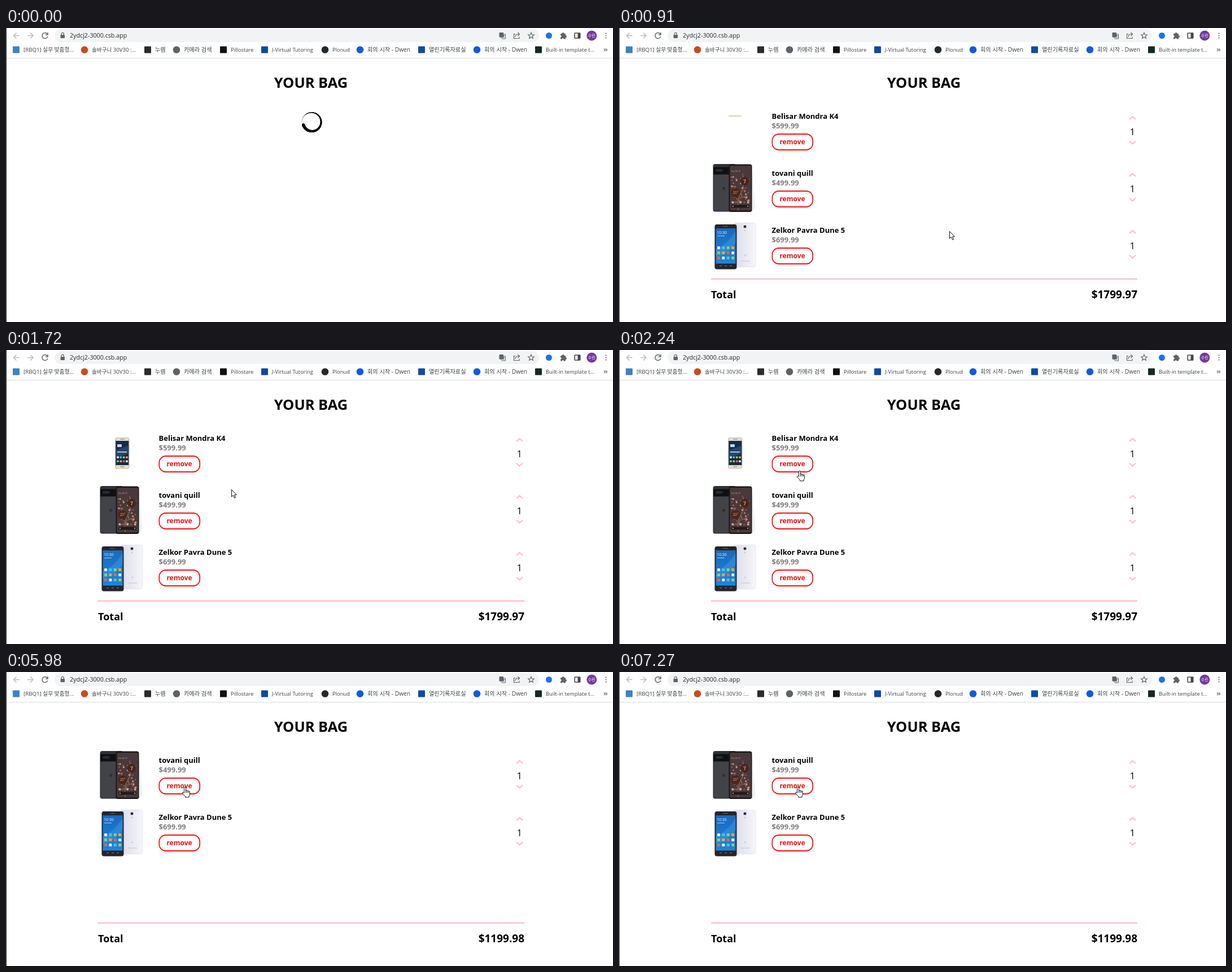
Recreate the animation shown at these times as an HTML page. Size 1075x521 px, loop 8000 ms.

```html
<!DOCTYPE html>
<html lang="ko">
<head>
<meta charset="utf-8">
<title>Your bag</title>
<style>
html, body { margin: 0; width: 100%; height: 100%; overflow: hidden; background: #fff; }
svg { display: block; font-family: 'Open Sans', 'Noto Sans CJK KR', 'Noto Sans CJK', sans-serif; }
.icon { fill: none; stroke: #5f6368; stroke-width: 1.5; }
.bold { font-weight: 700; }
</style>
</head>
<body>
<svg id="stage" width="1075" height="521" viewBox="0 0 1075 521"></svg>
<script>
const LOOP = 8000;
const stage = document.getElementById('stage');

const text = (x, y, size, str, attrs = '') =>
  `<text x="${x}" y="${y}" font-size="${size}" ${attrs}>${str}</text>`;
const rect = (x, y, w, h, fill, r = 0, attrs = '') =>
  `<rect x="${x}" y="${y}" width="${w}" height="${h}" fill="${fill}" rx="${r}" ${attrs}/>`;
const disc = (x, y, r, fill, attrs = '') =>
  `<circle cx="${x}" cy="${y}" r="${r}" fill="${fill}" ${attrs}/>`;
const icon = (d, attrs = '') => `<path class="icon" d="${d}" ${attrs}/>`;
const repeat = (n, draw) => Array.from({ length: n }, (_, i) => draw(i)).join('');

// Browser toolbar and bookmarks
function toolbar() {
  const pale = 'style="stroke:#b9bcc0"';
  return rect(86, 2, 858, 23, '#f1f3f4', 11.5) +
    icon('M23.5 13.5h-10m5-5l-5 5l5 5', pale) +
    icon('M38 13.5h10m-5-5l5 5l-5 5', pale) +
    icon('M73 10.5a5 5 0 1 0 .8 4.5M74 8v4h-4') +
    rect(96.5, 12, 7.5, 6, '#5f6368', 1) +
    icon('M98 12.5v-2a2.2 2.2 0 0 1 4.4 0v2', 'style="stroke-width:1.2"') +
    text(113, 17.3, 10.7, '2ydcj2-3000.csb.app', 'fill="#27292c"') +
    rect(873.5, 8, 7.5, 8.5, '#5f6368', 1) +
    icon('M879 11h5.5v8h-6l-2-3M879 13.5h4.5M881.3 12v1.5q0 2.5-2 3.5m.5-3q1 2 3 3', 'style="stroke-width:1"') +
    icon('M902 10.5h-2.5v8h9.5v-3M902 16q0-5 5-5h2.5m-3-3l3 3l-3 3', 'style="stroke-width:1.1"') +
    icon('M930 8.3l1.5 3.5 3.8.3-2.9 2.4.9 3.8-3.3-2-3.3 2 .9-3.8-2.9-2.4 3.8-.3z', 'style="stroke-width:1.2"') +
    disc(961.5, 13.5, 5.5, '#1a73e8') +
    '<path fill="#5f6368" d="M982 10h2.5a2 2 0 0 1 4 0h2.500v3a2 2 0 0 1 0 4v2.500h-3.200a1.600 1.600 0 0 0-3.200 0H982v-3a1.700 1.700 0 0 0 0-3.400z"/>' +
    rect(1007.2, 9, 9.5, 9, 'none', 0.5, 'stroke="#44474b" stroke-width="1.6"') +
    rect(1012.5, 9, 4, 9, '#44474b') +
    disc(1037.3, 13.5, 9, '#77389f') +
    text(1037.3, 16, 7, '수린', 'fill="#fff" text-anchor="middle"') +
    repeat(3, i => disc(1062.5, 9.5 + 4 * i, 1.1, '#5f6368')) +
    bookmarks() +
    icon('M1059 36.5l2.300 2.300-2.300 2.300m3.200-4.600l2.300 2.300-2.300 2.300', 'style="stroke-width:1.2"') +
    rect(0, 53, 1075, 1, '#dcdee1') +
    rect(0, 0, 1, 521, '#333');
}

function bookmarks() {
  // icon centre, shape, colour, label, label size
  const list = [
    [18, 'square', '#3a83c5', '[RBQ1] 실무 맞춤형...', 9.7],
    [139, 'circle', '#cb4b1e', '솔바구니 30V30 :...', 9.6],
    [251, 'square', '#2b2b2b', '누렘', 10.2],
    [302, 'circle', '#5f6368', '카메라 검색', 10.2],
    [385, 'square', '#111', 'Pillostare', 9.4],
    [458, 'square', '#0b4aa2', 'J-Virtual Tutoring', 9.4],
    [565, 'circle', '#24292f', 'Plonud', 9.4],
    [627, 'circle', '#0b5cdf', '회의 시작 - Dwen', 10.2],
    [736, 'square', '#0c4da2', '열린기록자료실', 10.2],
    [834, 'circle', '#0b5cdf', '회의 시작 - Dwen', 10.2],
    [943, 'square', '#15291f', 'Built-in template t...', 9.4]
  ];
  return list.map(([x, shape, color, label, size]) =>
    (shape === 'circle' ? disc(x, 38.5, 6.3, color) : rect(x - 6, 32.5, 12, 12, color, 1)) +
    text(x + 13, 42, size, label, 'fill="#3c4043"')).join('');
}

// Ring of dots that grows from a hairline to a thick round end
const spinner = () => '<g id="spinner">' + repeat(180, i => {
  const a = (163 - i * 1.9) * Math.PI / 180;
  const w = 2.4 * (1 - i / 180) + 0.15;
  const r = 18 - w;
  return disc((541.5 + r * Math.cos(a)).toFixed(2), (167 + r * Math.sin(a)).toFixed(2), w.toFixed(2), '#000');
}) + '</g>';

const appIcons = (x, y, cols, rows, dx, dy, size) => {
  const colors = ['#f2f5f7', '#f4a63a', '#54bfd9', '#e9654c', '#8fcf6a'];
  return repeat(cols * rows, i => rect(x + dx * (i % cols), y + dy * Math.floor(i / cols),
    size, size, colors[(i * 2 + Math.floor(i / cols)) % 5], 1));
};

const smallPhone = () =>
  rect(193, 155, 25.5, 55.5, '#cdbfac', 4) +
  rect(194.3, 156, 23, 53.5, '#e5ddd0', 3) +
  rect(202, 157.5, 8, 1, '#8c8277') +
  rect(194.300, 161, 23, 43, '#132c49') +
  '<path d="M194.300 178l23-9v14l-23 9z" fill="#24476c"/>' +
  rect(197, 167, 8, 5, '#c7d7e4', 1) +
  rect(197, 180, 17, 1.500, '#e4eaef') +
  appIcons(196.3, 188.5, 4, 2, 5.3, 7, 3.6) +
  rect(202.500, 205.500, 7, 2.500, '#bfae98', 1.2);

const darkPhone = () =>
  '<path d="M236 148l5.500 70-5 6h-36z" fill="#f1f1f1"/>' +
  rect(166.5, 140, 41, 84.5, '#303236', 4) +
  rect(168, 158, 28, 65, '#414348', 3) +
  rect(167, 145.5, 29, 13, '#0f1012') +
  rect(171, 149, 13, 4.5, '#292c33', 2.2) +
  disc(185.5, 183, 2.6, '#2d2f33') +
  rect(194.5, 140.5, 41, 84.5, '#19191b', 4) +
  rect(196.5, 143, 37.5, 79.5, '#49393a', 2) +
  '<path d="M211 222q-2-21 5-31t3-34M214 193l-12-14m16-2l13-11m-18 35l15-5m-13 8l-13 5" fill="none" stroke="#895e50" stroke-width="1.500"/>' +
  repeat(46, i => disc((199 + (i * 13.7 + 6 * Math.sin(i)) % 32).toFixed(1),
    (163 + (i * 8.3) % 47).toFixed(1), 1 + i % 3 * 0.35, ['#b77663', '#966253', '#d19478'][i % 3])) +
  disc(222.5, 170.5, 7.8, '#45261e') +
  '<path d="M222 174l2-6h-4" fill="none" stroke="#dc9a69" stroke-width="1.200"/>' +
  disc(206.5, 191, 8, '#49261b') +
  text(206.5, 193, 6.5, '20°', 'fill="#e3a66e" text-anchor="middle"') +
  text(199, 154, 3, 'Tue, Oct 19', 'fill="#d9ccc9"') +
  repeat(5, i => disc(201.5 + 6.8 * i, 208, 2, ['#d5aa92', '#7d5145'][i % 2])) +
  rect(199, 212.5, 32, 5, '#1e1b1c', 2.5) +
  disc(202, 215, 1, '#dbc7bd') + disc(228, 215, 1, '#dbc7bd');

const bluePhone = () =>
  rect(202, 143.5, 40, 78, 'url(#shell)', 4, 'stroke="#dadae4" stroke-width=".6"') +
  disc(223, 150, 3.2, '#c7c8cf') + disc(223, 150, 2.3, '#25272e') +
  disc(223, 157, 1.2, '#d4c5a5') +
  rect(216, 210.5, 16, 1, '#c4c5ce') +
  disc(223.5, 201, 1.8, '#d1d2db') +
  rect(169.5, 146, 39, 79.5, '#25252b', 4) +
  rect(184, 149, 9, 1, '#65656c') +
  rect(171.5, 153, 35, 62.5, 'url(#screen)') +
  '<path d="M171.500 190q20-8 35-32v20q-13 20-35 25z" fill="#49a9ec" opacity=".35"/>' +
  text(173, 163, 7, '10:30', 'fill="#eef6ff"') +
  rect(174, 166, 13, 1, '#a9d3f6') +
  appIcons(174, 185, 4, 3, 8.4, 9, 5) +
  repeat(3, i => rect(178 + 9 * i, 219, 4, 1, '#85858c'));

const chevron = (y, dir) =>
  `<path d="M904 ${y}l5.500 ${5 * dir}l5.500 ${-5 * dir}" fill="none" stroke="#ffbac6" stroke-width="2"/>`;

const item = (name, price, photo, i) => `<g id="item${i}"><g${i ? '' : ' clip-path="url(#loaded)"'}>${photo}</g>` +
  text(270.5, 161, 13, name, 'class="bold"') +
  text(270.5, 177.7, 13, price, 'class="bold" fill="#7e7e7e"') +
  rect(271.4, 188, 71.8, 28, '#fff', 11.5, 'stroke="#f21414" stroke-width="1.800"') +
  text(307, 206, 12, 'remove', 'class="bold" fill="#e81212" text-anchor="middle"') +
  chevron(162, -1) + text(909.3, 189.5, 16, '1', 'text-anchor="middle"') + chevron(200.5, 1) + '</g>';

stage.innerHTML = `<defs>
  <clipPath id="loaded"><rect id="reveal" x="190" y="155" width="32" height="56"/></clipPath>
  <linearGradient id="shell"><stop stop-color="#dcdce8"/><stop offset="1" stop-color="#f5f5fa"/></linearGradient>
  <linearGradient id="screen" x2="0" y2="1"><stop stop-color="#1a69bd"/><stop offset="1" stop-color="#1c86dc"/></linearGradient>
  </defs>` +
  toolbar() +
  text(540, 106, 25.5, 'YOUR BAG', 'class="bold" text-anchor="middle"') +
  spinner() +
  '<g id="bag">' +
  item('Belisar Mondra K4', '$599.99', smallPhone(), 0) +
  item('tovani quill', '$499.99', darkPhone(), 1) +
  item('Zelkor Pavra Dune 5', '$699.99', bluePhone(), 2) +
  rect(163, 443.5, 755, 2.4, '#ffc0cb') +
  text(163, 479, 18, 'Total', 'class="bold"') +
  text(918, 479, 19, '', 'id="total" class="bold" text-anchor="end"') + '</g>' +
  disc(316.5, 202.5, 9.5, '#ff0', 'id="click" fill-opacity=".47"') +
  '<g id="cursor" fill="#fff" stroke="#111" stroke-width="1" stroke-linejoin="round">' +
  '<path id="arrow" d="M.5 .5v12.500l2.900-2.700l2.200 5l2-.900l-2.100-4.700h4z"/>' +
  '<path id="hand" d="M-1.500 11V2a1.500 1.500 0 0 1 3 0V6.500q1.700-1 2.500.5q1.700-.8 2.400.6q2-.4 2 1.400V13q0 2-1.400 3.500v2H.500V17L-4 12q-1.200-2 .2-2.500q1 0 2.300 1.500zM1.500 6.500v4M4 7v3.500M6.400 7.600v3"/></g>';

const el = id => document.getElementById(id);
const show = (id, on) => el(id).setAttribute('visibility', on ? 'inherit' : 'hidden');
const move = (id, x, y) => el(id).setAttribute('transform', `translate(${x} ${y})`);

// Pointer path: time, x, y
const path = [
  [490, 636, 399], [789, 636, 399], [790, 627, 392], [910, 585, 360], [1030, 505, 309],
  [1210, 398, 246], [1719, 398, 246], [1720, 399, 247], [1850, 385, 242], [2110, 336, 221],
  [2240, 320, 213.5], [2435, 318, 203.5], [2569, 318, 203.5], [2570, 317, 203.5], [LOOP, 317, 203.5]
];

const snap = (t, from, to, step) =>
  t >= from && t < to ? from + Math.floor((t - from) / step) * step : t;

function pointer(t) {
  t = snap(snap(t, 790, 1260, 60), 1720, 2500, 65);
  const i = Math.max(1, path.findIndex(p => p[0] > t));
  const [a, b] = [path[i - 1], path[i]];
  const k = Math.max(0, (t - a[0]) / (b[0] - a[0]));
  return [a[1] + (b[1] - a[1]) * k, a[2] + (b[2] - a[2]) * k];
}

function draw(t) {
  const removed = t >= 5980;
  show('spinner', t < 70);
  show('bag', t >= 70);
  show('item0', !removed);
  move('item1', 0, removed ? 0 : 101);
  move('item2', 0, removed ? 101 : 202);
  el('reveal').setAttribute('height', t < 490 ? 0 : t < 970 ? 2 : 56);
  el('total').textContent = removed ? '$1199.98' : '$1799.97';

  const [x, y] = pointer(t);
  const onButton = y < 217;
  show('cursor', t >= 490);
  move('cursor', x.toFixed(1), y.toFixed(1));
  show('arrow', !onButton);
  show('hand', onButton);
  show('click', (t >= 2710 && t < 2940) || (t >= 7040 && t < 7270));
}

const start = performance.now();
(function tick() {
  draw((performance.now() - start) % LOOP);
  requestAnimationFrame(tick);
})();
</script>
</body>
</html>
```
